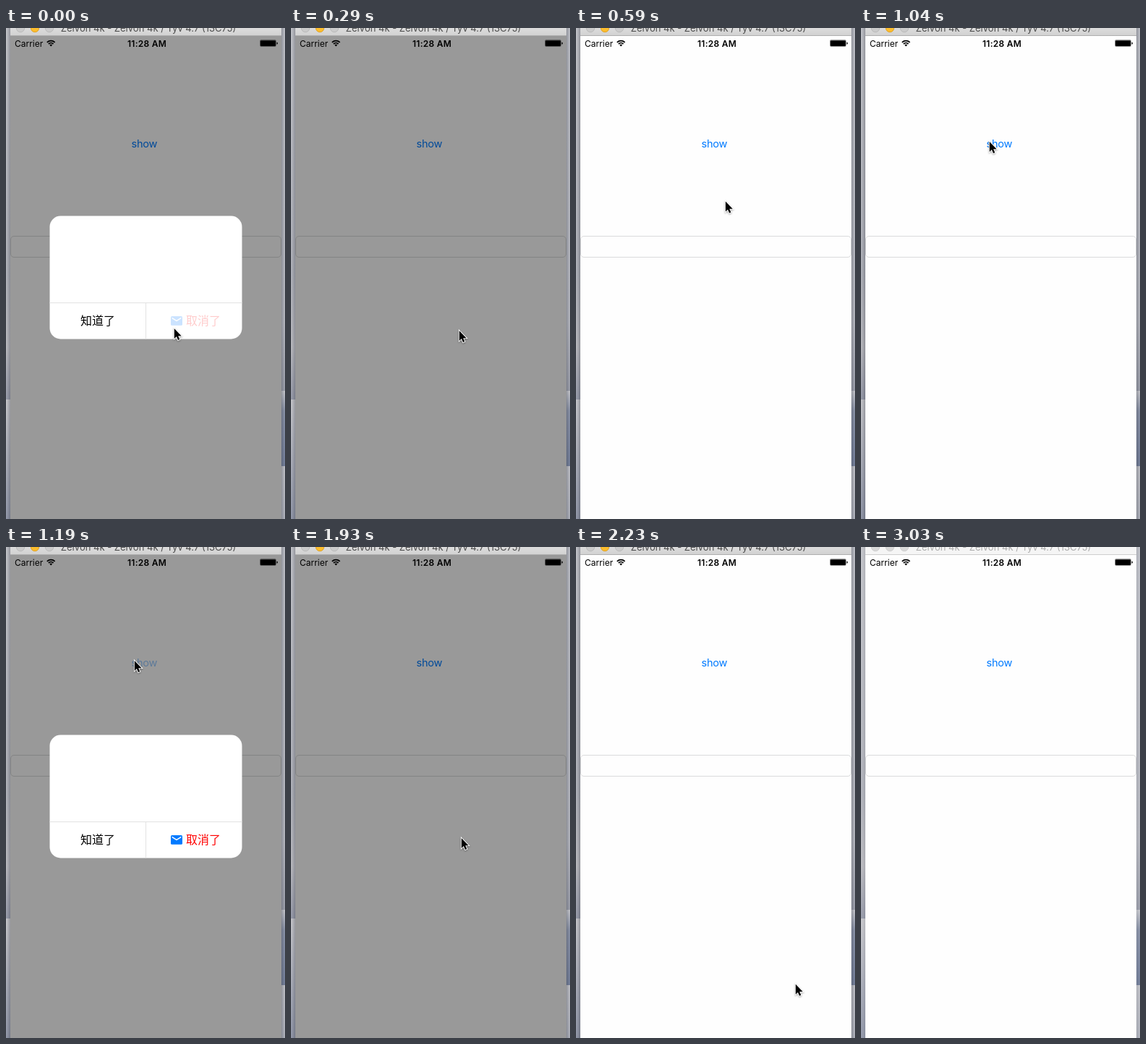
Animation, 386 px wide and 678 px high, one loop 3090 ms. Source, as an HTML page:

```html
<!DOCTYPE html>
<html lang="zh-CN">
<head>
<meta charset="utf-8">
<title>Alert demo</title>
<style>
  html, body { margin: 0; width: 100%; height: 100%; overflow: hidden; background: #fff; }
  svg { display: block; width: 386px; height: 678px; }
  text { font-family: Inter, Roboto, sans-serif; }
  .cjk { font: 16px "Noto Sans CJK SC", "Noto Sans CJK", sans-serif; }
  .bar { fill: url(#barOn); }
  .edge { fill: #afafaf; }
  .title { fill: #4c4c4c; font-size: 13px; }
  .light { fill: #cbcbcb; stroke: #bababa; }
  .mid { fill: #fcbd2d; stroke: #e0a32a; }
  .idle .bar { fill: #f5f5f5; }
  .idle .edge { fill: #cfcfcf; }
  .idle .title { fill: #adadad; }
  .idle .light { fill: #d9d9d9; stroke: #cfcfcf; }
  .idle .shade { opacity: .5; }
  #cursor { filter: drop-shadow(0 1px .8px rgba(0, 0, 0, .35)); }
</style>
</head>
<body>
<svg id="stage" viewBox="0 0 386 678">
  <defs>
    <linearGradient id="barOn" x2="0" y2="1">
      <stop stop-color="#dcdcdc"/><stop offset="1" stop-color="#d1d1d1"/>
    </linearGradient>
    <linearGradient id="left" x2="0" y2="1">
      <stop stop-color="#cfd0d5"/><stop offset=".5" stop-color="#bcbec6"/>
      <stop offset=".65" stop-color="#c6c6cb"/><stop offset=".757" stop-color="#a2a6b5"/>
      <stop offset=".757" stop-color="#d4d4d8"/><stop offset="1" stop-color="#9ca2b4"/>
    </linearGradient>
    <linearGradient id="right" x2="0" y2="1">
      <stop stop-color="#c9cbd2"/><stop offset=".6" stop-color="#c0c2ca"/>
      <stop offset=".739" stop-color="#a6a9b5"/><stop offset=".739" stop-color="#d2d3d8"/>
      <stop offset=".78" stop-color="#929bb1"/><stop offset=".892" stop-color="#7b87a3"/>
      <stop offset=".892" stop-color="#cbccd2"/><stop offset="1" stop-color="#babdc7"/>
    </linearGradient>
    <linearGradient id="shadow">
      <stop stop-color="#222530" stop-opacity=".05"/>
      <stop offset="1" stop-color="#222530" stop-opacity=".34"/>
    </linearGradient>
  </defs>

  <!-- desktop -->
  <rect width="6" height="678" fill="url(#left)"/>
  <rect x="381" width="5" height="678" fill="url(#right)"/>
  <rect class="shade" width="6" height="678" fill="url(#shadow)"/>
  <rect class="shade" width="5" height="678" fill="url(#shadow)" transform="matrix(-1 0 0 1 386 0)"/>

  <!-- window bar -->
  <rect class="bar" x="6" width="375" height="11"/>
  <rect class="edge" x="6" y="10" width="375" height="1"/>
  <circle class="light" cx="20" r="5.7"/>
  <circle class="light mid" cx="40" r="5.7"/>
  <circle class="light" cx="60" r="5.7"/>
  <text class="title" x="197" y="5" text-anchor="middle">Zelvon 4k - Zelvon 4k / Tyv 4.7 (13C75)</text>

  <!-- screen -->
  <rect x="6" y="11" width="375" height="667" fill="#fefefe"/>
  <text id="show" x="173.5" y="165" font-size="14.6" letter-spacing="-.3" fill="#007aff">show</text>
  <rect x="6.5" y="287.5" width="374" height="29" rx="4.5" fill="none" stroke="#dadbdc"/>
  <rect id="dim" x="6" y="11" width="375" height="667"/>

  <!-- status bar -->
  <text x="12" y="25.5" font-size="12">Carrier</text>
  <g fill="none" stroke="#000" stroke-width="1.8">
    <path d="M56.8 19.8a7.7 7.7 0 0 1 10.8 0M58.9 22a4.7 4.7 0 0 1 6.6 0"/>
    <path d="M62.2 25.4l-1.8-1.9a2.5 2.5 0 0 1 3.6 0z" fill="#000" stroke="none"/>
  </g>
  <text x="195" y="25.5" font-size="12" font-weight="600" letter-spacing=".25" text-anchor="middle">11:28 AM</text>
  <rect x="351.5" y="16.5" width="22" height="9" rx="1.6" fill="none" stroke="#000" stroke-width=".6" opacity=".65"/>
  <rect x="352" y="17.2" width="21" height="7.8" rx=".8"/>
  <path d="M374.5 19.4q1.5.3 1.5 1.7t-1.5 1.7z"/>

  <!-- alert -->
  <g id="alert">
    <rect x="60.5" y="259.5" width="266" height="170" rx="15" fill="#fff"/>
    <path d="M60.5 379.5h266M193.5 380v49.5" stroke="#e2e2e2" fill="none"/>
    <text class="cjk" x="103" y="410">知道了</text>
    <g id="cancel">
      <rect x="228" y="398" width="16" height="12.8" rx="1.6" fill="#007aff"/>
      <path d="M229.6 399.6l6.4 4 6.4-4v1.6l-6.4 4-6.4-4z" fill="#fff"/>
      <text class="cjk" x="249" y="410" fill="#f00">取消了</text>
    </g>
  </g>

  <path id="cursor" d="M.8 0V14L3.9 11.1 6.1 16 8.3 15 6.2 10.2H10.7Z"
    stroke="#fff" stroke-width="1.8" paint-order="stroke"/>
</svg>
<script>
  const LOOP = 3090, STEP = 149, LEAD = 8, IDLE = 3030;
  // all times below are counted in steps
  const OPEN = 8, CLOSE = [2, 13], PRESS = [2, 1], LEAVE = 17;
  const DIM = .4, FADE = 2;

  const easeIn = n => p => p ** n;
  const easeOut = n => p => 1 - (1 - p) ** n;
  const home = { x: 232, y: 415 };
  const moves = [
    { from: 0, to: 1, x: 232, y: 418, ease: easeOut(1), bend: 0 },
    { from: 3, to: 7, x: 177, y: 157, ease: easeOut(4), bend: 54 },
    { from: 8, to: 10, x: 245, y: 387, ease: easeIn(2.35), bend: 0 },
    { from: 10, to: 11, x: 235, y: 402, ease: easeOut(1), bend: 0 },
    { from: 13, to: 16, x: 319, y: 629, ease: easeOut(2), bend: -67 }
  ];

  const el = id => document.getElementById(id);
  const fade = (id, v) => el(id).setAttribute('opacity', v);
  const clamp = v => Math.min(1, Math.max(0, v));

  function cursorAt(k) {
    let { x, y } = home;
    for (const m of moves) {
      const e = m.ease(clamp((k - m.from) / (m.to - m.from)));
      x += (m.x - x) * e + m.bend * e * (1 - e);
      y += (m.y - y) * e;
    }
    return [x, y];
  }

  function draw(t) {
    const k = Math.floor((t + LEAD) / STEP);
    const round = k < OPEN ? 0 : 1;
    const left = CLOSE[round] - k;
    const idle = t >= IDLE;
    el('cursor').setAttribute('transform', `translate(${cursorAt(k)})`);
    fade('cursor', k < LEAVE ? 1 : 0);
    fade('dim', DIM * (1 - clamp(-left / FADE)) ** 2.4);
    fade('alert', left > 0 ? 1 : 0);
    fade('cancel', left <= PRESS[round] ? .2 : 1);
    fade('show', round ? clamp(.4 + .3 * (k - OPEN)) : 1);
    el('stage').classList.toggle('idle', idle);
  }

  const start = performance.now();
  function tick() {
    draw((performance.now() - start) % LOOP);
    requestAnimationFrame(tick);
  }
  tick();
</script>
</body>
</html>
```
